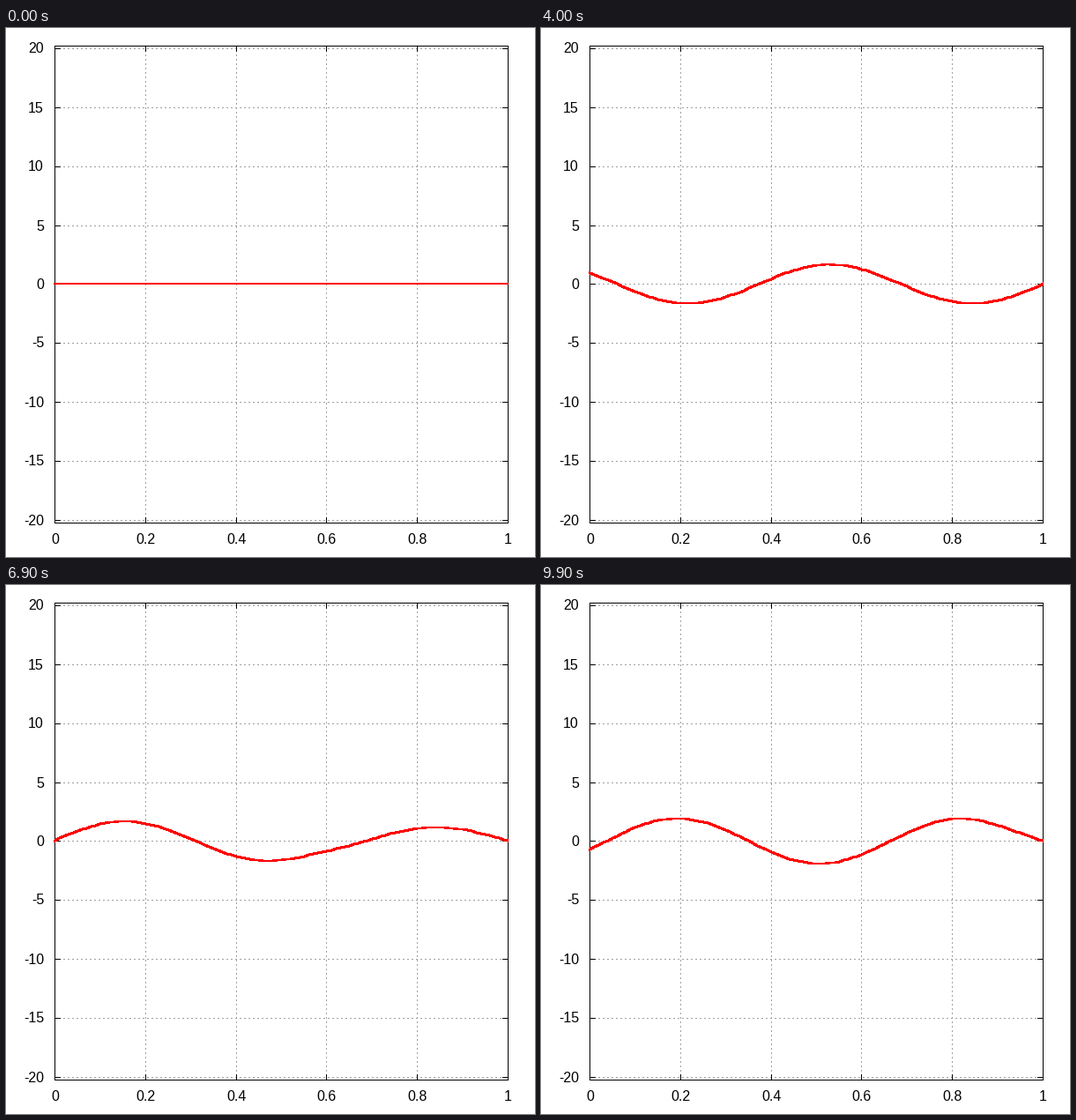
These frames come from a looping animation (600x600 px, 10000 ms). A matplotlib script:

```python
import numpy as np
import matplotlib.pyplot as plt
from matplotlib.animation import FuncAnimation
from matplotlib.patches import Rectangle

SIZE, DPI = 600, 100
PX = 72 / DPI                      # one pixel in points
LEFT, RIGHT, TOP, BOTTOM = 55, 569, 20, 561
FRAMES, INTERVAL = 100, 100
CELLS, STEPS, DT, OMEGA = 100, 125, 0.0004, 10


def col(x):
    return np.floor(LEFT + (RIGHT - LEFT) * x + 0.5)


def row(y):
    return np.floor(290.45 - 13.375 * y + 0.5)


def solve_wave():
    """String driven by a sine at x=0 and fixed at x=1 (implicit scheme)."""
    r2 = (DT * CELLS) ** 2
    n = CELLS - 1
    off = np.eye(n, k=1) + np.eye(n, k=-1)
    inv = np.linalg.inv((1 + 2 * r2) * np.eye(n) - r2 * off)
    old, cur = np.zeros(n), np.zeros(n)
    shots = [np.zeros(CELLS + 1)]
    for f in range(1, FRAMES):
        for s in range(STEPS):
            drive = np.sin(OMEGA * DT * ((f - 1) * STEPS + s + 1))
            rhs = 2 * cur - old
            rhs[0] += r2 * drive
            old, cur = cur, inv @ rhs
        shots.append(np.concatenate(([drive], cur, [0])))
    return shots


fig = plt.figure(figsize=(SIZE / DPI, SIZE / DPI), dpi=DPI, facecolor="white")
ax = fig.add_axes([0, 0, 1, 1])
ax.set_xlim(0, SIZE)
ax.set_ylim(SIZE, 0)
ax.axis("off")


def stroke(xs, ys, color="black", **kw):
    line, = ax.plot(xs, ys, color=color, lw=PX, antialiased=False,
                    snap=False, solid_capstyle="butt",
                    dash_capstyle="butt", **kw)
    return line


def label(x, y, text, ha):
    ax.text(x, y, text, ha=ha, va="baseline", family="Liberation Sans",
            fontsize=16 * PX, color="black")


GRID = dict(color="#a0a0a0", dashes=(2, 3), zorder=1)
TICK = 7

for v in range(-20, 21, 5):
    y = row(v) + 0.5
    stroke([LEFT, RIGHT + 1], [y, y], **GRID)
    stroke([LEFT, LEFT + TICK], [y, y], zorder=2)
    stroke([RIGHT + 1 - TICK, RIGHT + 1], [y, y], zorder=2)
    label(43, y + 5, str(v), "right")

for i in range(6):
    x = col(i / 5) + 0.5
    if 0 < i < 5:
        stroke([x, x], [BOTTOM + 1, TOP], **GRID)
        stroke([x, x], [TOP, TOP + TICK], zorder=2)
        stroke([x, x], [BOTTOM + 1 - TICK, BOTTOM + 1], zorder=2)
    label(x, 585, f"{i / 5:g}", "center")

for y in (TOP + 0.5, BOTTOM + 0.5):
    stroke([LEFT, RIGHT + 1], [y, y], zorder=2)
for x in (LEFT + 0.5, RIGHT + 0.5):
    stroke([x, x], [TOP, BOTTOM + 1], zorder=2)

waves = solve_wave()
xs = col(np.linspace(0, 1, CELLS + 1)) + 0.5
curve, = ax.plot(xs, row(waves[0]), color="red", lw=2 * PX, zorder=3,
                 antialiased=False, snap=False,
                 solid_capstyle="projecting", solid_joinstyle="round")
curve.set_clip_path(Rectangle((LEFT - 1, TOP), RIGHT - LEFT + 2,
                              BOTTOM - TOP, transform=ax.transData))


def draw(f):
    curve.set_ydata(row(waves[f]))
    return curve,


anim = FuncAnimation(fig, draw, frames=FRAMES, interval=INTERVAL,
                     repeat=True, repeat_delay=0, blit=False)
plt.show()
```
